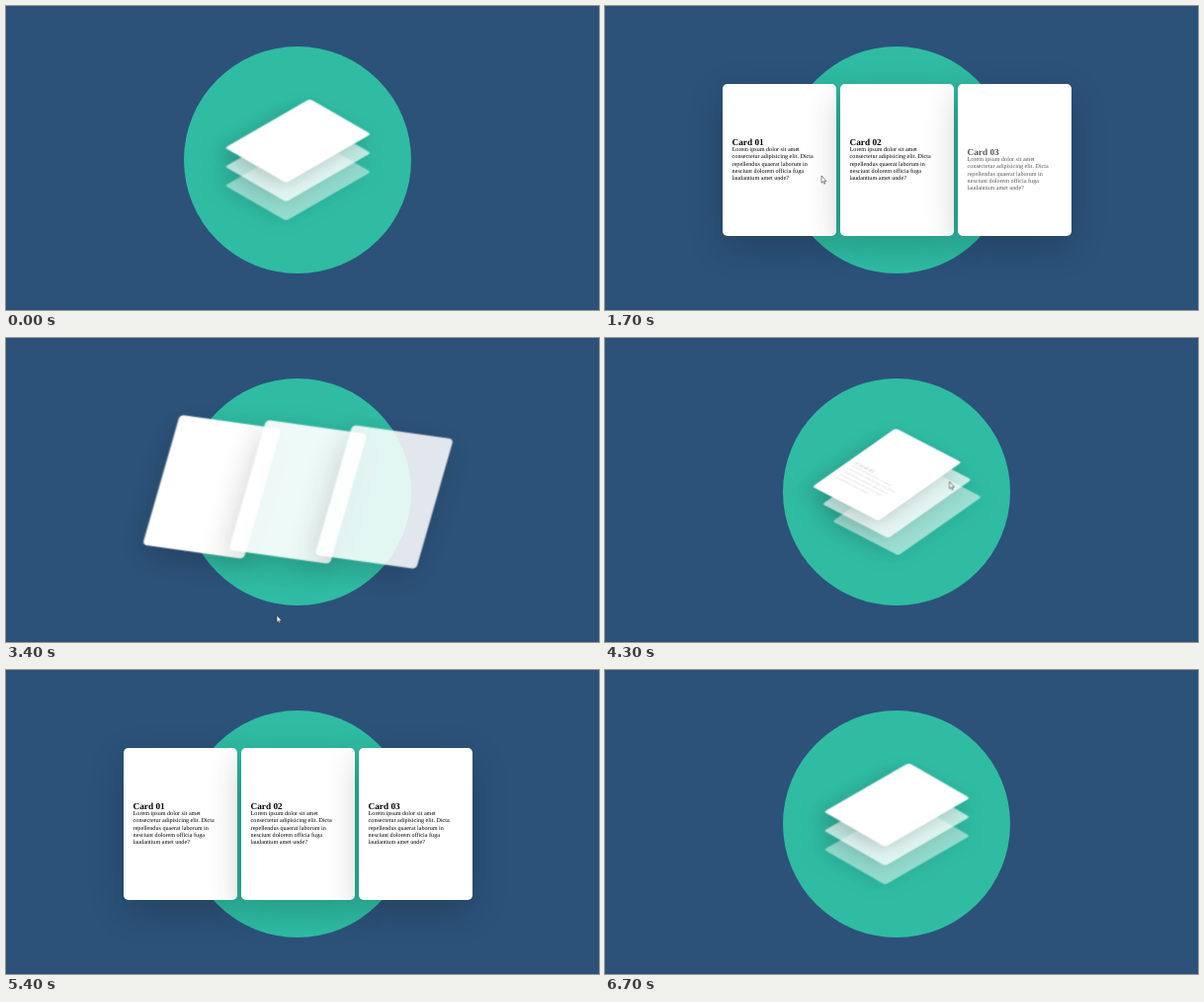
An HTML page that plays this animation: 600 px wide and 308 px high, repeating every 6.8 s.

```html
<!DOCTYPE html>
<html lang="en">
<head>
<meta charset="utf-8">
<title>Layered cards</title>
<style>
  html, body {
    margin: 0;
    width: 100%;
    height: 100%;
    overflow: hidden;
    background: #2c527a;
  }
  .stage {
    position: absolute;
    inset: 0;
    width: 600px;
    height: 308px;
    overflow: hidden;
    background: #2c527a;
    --loop: 6800ms;
  }
  .disc {
    position: absolute;
    left: 180.2px;
    top: 40.7px;
    width: 230px;
    height: 230px;
    border-radius: 50%;
    background: #2fbca3;
  }

  /* --x: open offset, --y: stacked offset, --o: stacked opacity */
  .card {
    --stacked: translate(0px, var(--y)) rotate(30deg) skewX(-30deg) scale(.62, .556);
    --spread: translate(var(--x), 0px) rotate(0deg) skewX(0deg) scale(1, 1);
    position: absolute;
    left: 238px;
    top: 79.2px;
    box-sizing: border-box;
    width: 115px;
    height: 153.5px;
    padding-left: 9.6px;
    display: flex;
    align-items: center;
    border-radius: 4.8px;
    background: #fff;
    box-shadow: 0 11px 36px rgba(0, 0, 0, .2);
    animation: deal var(--loop) linear infinite;
  }
  .c1 { --x: -119px; --y: -19.2px; --o: 1;   --open-z: 0; --stack-z: 4; --wait: 0ms; }
  .c2 { --x: 0px;    --y: 0px;     --o: .7;  --open-z: 1; --stack-z: 2; --wait: 320ms; }
  .c3 { --x: 119px;  --y: 19.2px;  --o: .48; --open-z: 1; --stack-z: 1; --wait: 640ms; }

  /* each easing sits with its full keyframe, so it applies to every property */
  @keyframes deal {
    0%, 97.941%, 100% {
      transform: var(--stacked); opacity: var(--o); z-index: var(--stack-z);
    }
    11.618%, 61.324% {
      transform: var(--stacked); opacity: var(--o); z-index: var(--stack-z);
      animation-timing-function: ease-in-out;
    }
    21.029%, 70.735% {
      transform: var(--spread); opacity: 1; z-index: var(--open-z);
    }
    46.838% {
      transform: var(--spread); opacity: 1; z-index: var(--open-z);
      animation-timing-function: cubic-bezier(.3, .1, .3, 1);
    }
    80.294% {
      transform: var(--spread); opacity: 1; z-index: var(--open-z);
      animation-timing-function: ease;
    }
  }

  .text { animation: fade var(--loop) linear infinite; }
  .text div {
    font: 6.15px/7.05px "Liberation Serif", "Times New Roman", serif;
    color: #000;
    white-space: nowrap;
    text-rendering: geometricPrecision;
    animation: rise var(--loop) ease-in-out var(--wait) infinite backwards;
  }
  h2 {
    margin: 0;
    font-size: 9.22px;
    line-height: 10.6px;
  }

  @keyframes fade {
    0%, 46.838% { opacity: 1; }
    49.485%, 60.15% { opacity: 0; }
    60.3%, 80.294% { opacity: 1; }
    82.941%, 100% { opacity: 0; }
  }
  @keyframes rise {
    0%, 11.618%, 50.01%, 61.324%, 83.83%, 100% { opacity: 0; transform: translateY(30px); }
    18.235%, 50%, 67.941%, 83.82% { opacity: 1; transform: translateY(0); }
  }

  .pointer {
    position: absolute;
    left: 0;
    top: 0;
    z-index: 9;
    width: 8px;
    height: 12px;
    overflow: visible;
    animation: roam var(--loop) linear infinite, show var(--loop) step-end infinite;
  }
  @keyframes roam {
    0%, 9.4% { transform: translate(300px, 257px); }
    11.8% { transform: translate(272px, 215px); }
    17.6% { transform: translate(228px, 178px); }
    25% { transform: translate(219px, 172px); }
    32.4% { transform: translate(222px, 176px); }
    40.4% { transform: translate(268px, 274px); }
    44.1%, 46.3% { transform: translate(274px, 293px); }
    50% { transform: translate(274px, 281px); }
    55.9% { transform: translate(290px, 260px); }
    61.3% { transform: translate(338px, 178px); }
    63.2% { transform: translate(349px, 145px); }
    66.2% { transform: translate(318px, 178px); }
    70.6% { transform: translate(169px, 264px); }
    75.7%, 100% { transform: translate(150px, 310px); }
  }
  @keyframes show {
    0%, 75.7%, 100% { opacity: 0; }
    9.4% { opacity: 1; }
  }
</style>
</head>
<body>
<div class="stage">
  <div class="disc"></div>
  <div class="card c1"><div class="text"><div>
    <h2>Card 01</h2>
    Lorem ipsum dolor sit amet<br>consectetur adipisicing elit. Dicta<br>repellendus quaerat laborum in<br>nesciunt dolorem officia fuga<br>laudantium amet unde?
  </div></div></div>
  <div class="card c2"><div class="text"><div>
    <h2>Card 02</h2>
    Lorem ipsum dolor sit amet<br>consectetur adipisicing elit. Dicta<br>repellendus quaerat laborum in<br>nesciunt dolorem officia fuga<br>laudantium amet unde?
  </div></div></div>
  <div class="card c3"><div class="text"><div>
    <h2>Card 03</h2>
    Lorem ipsum dolor sit amet<br>consectetur adipisicing elit. Dicta<br>repellendus quaerat laborum in<br>nesciunt dolorem officia fuga<br>laudantium amet unde?
  </div></div></div>
  <svg class="pointer" viewBox="0 0 8 12">
    <path d="M0 0V7.2L1.6 5.8 2.7 8.2 3.7 7.8 2.7 5.4H4.9Z" fill="#fff" stroke="#333" stroke-width=".6"/>
  </svg>
</div>
</body>
</html>
```
